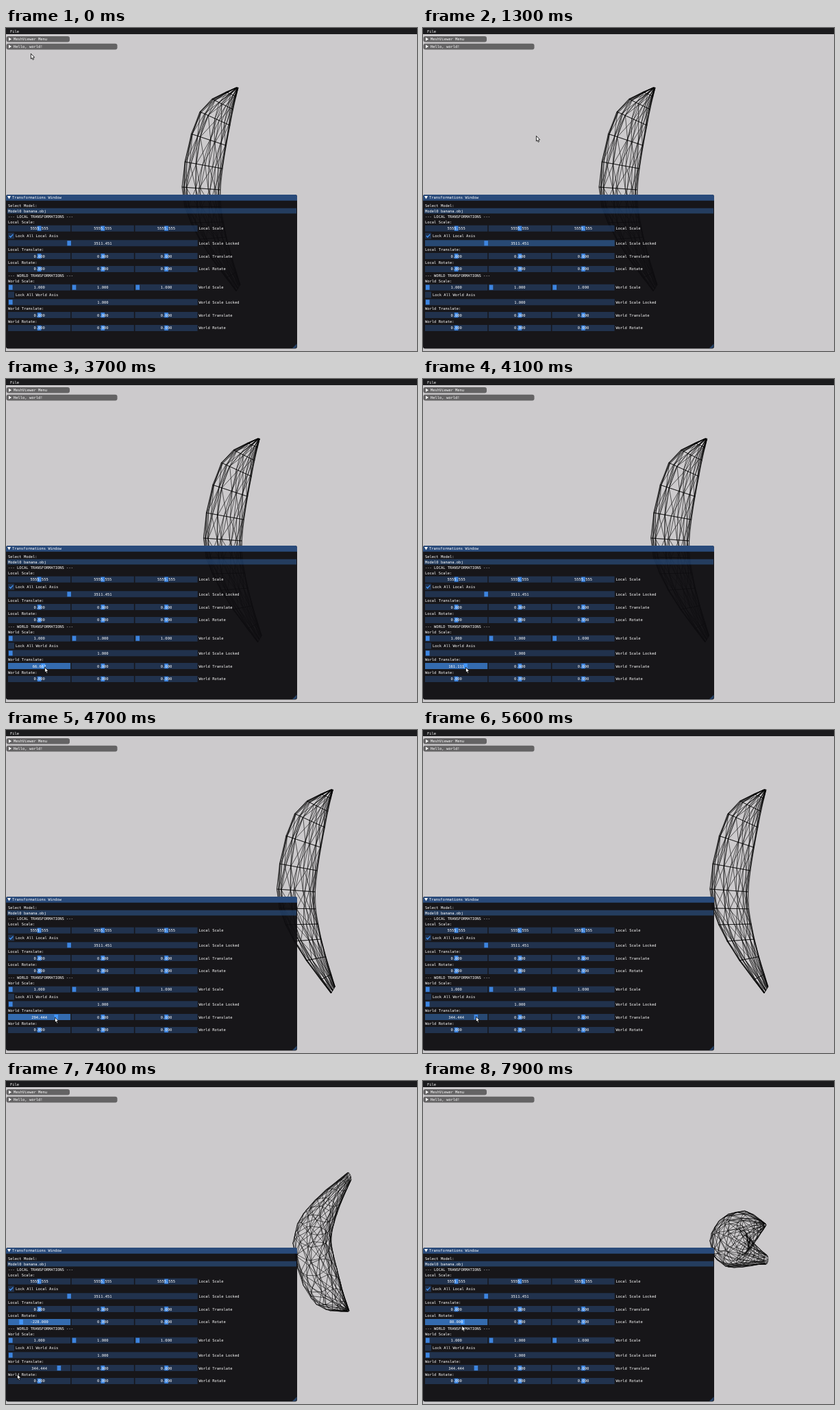
Animation of 600 by 471 pixels, one loop 8000 ms. Source, as an HTML page with a canvas:

```html
<!DOCTYPE html>
<html>
<head>
<meta charset="utf-8">
<style>
html, body { margin: 0; width: 100%; height: 100%; overflow: hidden; background: #cccacc; }
canvas { display: block; width: 600px; height: 471px; }
</style>
</head>
<body>
<canvas id="stage" width="600" height="471"></canvas>
<script>
const c = document.getElementById('stage').getContext('2d');
const LOOP = 8000, STEP = 100;

// Key points: [ms, value...]
const POINTER = [
  [0, 36, 37], [300, 60, 268], [600, 48, 430], [1000, 150, 405], [1200, 162, 314],
  [1300, 165, 157], [1400, 165, 131], [1700, 50, 432], [1800, 50, 311], [2000, 60, 429],
  [3000, 52, 423], [3200, 49, 420], [4100, 62, 420], [5100, 77, 417.5], [5600, 77, 417.5],
  [5900, 92, 410], [6400, 48, 352], [6800, 60, 352], [7400, 16, 427], [7900, 56.5, 356.5]
];
const MOVE = [[3400, 0], [4100, 161.111], [4200, 180], [4900, 338.889], [5100, 344.444]];
const TURN = [[6500, 0], [6800, 80], [7000, 140], [7500, -320], [7900, 80]];

// Mesh outline, tip to stem
const LEFT = [[336, 87], [283, 122], [257, 232], [282, 308], [336, 384]];
const RIGHT = [[339, 87], [327, 142], [313, 236], [322, 305], [342, 374]];
const RINGS = 13, SIDES = 16, DEPTH = 1.2, CY = 235.5;

function at(keys, t, i = 1) {
  const n = keys.findIndex(k => k[0] > t);
  if (n < 0) return keys[keys.length - 1][i];
  if (n === 0) return keys[0][i];
  const a = keys[n - 1], b = keys[n];
  return a[i] + (b[i] - a[i]) * (t - a[0]) / (b[0] - a[0]);
}
const snap = (v, step) => Math.round(v / step) * step;

// Catmull-Rom curve through pts, u from 0 to 1
function spline(pts, u) {
  const last = pts.length - 1, n = Math.min(Math.floor(u * last), last - 1), f = u * last - n;
  const p = k => pts[Math.max(0, Math.min(last, n + k))];
  return [0, 1].map(i => {
    const [a, b, d, e] = [p(-1)[i], p(0)[i], p(1)[i], p(2)[i]];
    return b + f / 2 * (d - a + f * (2 * a - 5 * b + 4 * d - e + f * (3 * (b - d) + e - a)));
  });
}

function box(x, y, w, h, fill, r = 0) {
  c.fillStyle = fill;
  c.beginPath();
  c.roundRect(x, y, w, h, r);
  c.fill();
}
function path(...pts) {
  c.beginPath();
  for (let i = 0; i < pts.length; i += 2) c.lineTo(pts[i], pts[i + 1]);
}
function poly(fill, ...pts) {
  c.fillStyle = fill;
  path(...pts);
  c.closePath();
  c.fill();
}
function text(s, x, cy, align = 'left') {
  c.fillStyle = '#fff';
  c.textAlign = align;
  c.fillText(s, x, cy + 2);
}

const mesh = Array.from({ length: RINGS }, (_, i) => {
  const [lx, ly] = spline(LEFT, i / (RINGS - 1)), [rx, ry] = spline(RIGHT, i / (RINGS - 1));
  const hx = (rx - lx) / 2, hy = (ry - ly) / 2, r = Math.hypot(hx, hy) * DEPTH;
  return Array.from({ length: SIDES }, (_, j) => {
    const a = (j + 0.3 * Math.sin(i * 5.1 + j * 3.7)) * 2 * Math.PI / SIDES;
    return [lx + hx + hx * Math.cos(a), ly + hy - CY + hy * Math.cos(a), r * Math.sin(a)];
  });
});

function drawMesh(shift, deg) {
  const cos = Math.cos(deg * Math.PI / 180), sin = Math.sin(deg * Math.PI / 180);
  const pts = mesh.map(ring => ring.map(([x, y, z]) => [x + shift, CY + y * cos - z * sin]));
  const edge = (a, b) => {
    path(...a, ...b);
    c.stroke();
  };
  c.strokeStyle = '#000';
  c.lineWidth = 0.6;
  pts.forEach((ring, i) => ring.forEach((p, j) => {
    const k = (j + 1) % SIDES, next = pts[i + 1];
    edge(p, ring[k]);
    if (next) {
      edge(p, next[j]);
      edge(p, next[k]);
    }
  }));
}

function drawPanel(t, move, turn) {
  const moving = t >= 3400 && t < 5300, turning = t >= 6500;
  // Hover trails the pointer by one step
  const mx = at(POINTER, t - STEP), my = at(POINTER, t - STEP, 2);
  const over = (x, y, w, h) => !moving && !turning && mx >= x && mx < x + w && my >= y && my < y + h;
  let top = 254.8;
  const next = h => (top += h) - h / 2;
  const line = s => text(s, 3, next(8));

  function frame(x, cy, w, active) {
    const hot = over(x, cy - 4.5, w, 9);
    box(x, cy - 4.5, w, 9, active ? 'rgba(66,150,250,.67)' : hot ? 'rgba(66,150,250,.4)' : 'rgba(41,74,122,.54)');
  }
  function slider(x, cy, w, pos, label, active) {
    frame(x, cy, w, active);
    box(x + 1 + pos * (w - 7.6), cy - 3.6, 5.6, 7.2, active ? '#4296fa' : '#3d85e0');
    text(label, x + w / 2, cy, 'center');
  }
  // The first slider may differ from the other two
  function triple(label, rest, pos, first = rest, firstPos = pos, active) {
    const cy = next(10.8);
    for (let i = 0; i < 3; i++) {
      slider(3 + i * 92.7, cy, 91.2, i ? pos : firstPos, i ? rest : first, !i && active);
    }
    text(label, 281.5, cy);
  }
  function check(label, on) {
    const cy = next(10.8);
    frame(3, cy, 9);
    text(label, 14, cy);
    if (!on) return;
    c.strokeStyle = '#4296fa';
    c.lineWidth = 1.2;
    path(4.9, cy, 6.7, cy + 2, 10.3, cy - 2.2);
    c.stroke();
  }
  function group(name, scale, pos, lock, lockPos, move, turn) {
    line(`--- ${name.toUpperCase()} TRANSFORMATIONS ---`);
    line(name + ' Scale:');
    triple(name + ' Scale', scale, pos);
    check(`Lock All ${name} Axis`, lockPos > 0);
    const cy = next(10.8);
    slider(3, cy, 276.8, lockPos, lock);
    text(name + ' Scale Locked', 281.5, cy);
    line(name + ' Translate:');
    triple(name + ' Translate', '0.000', .5, move.toFixed(3), .5 + move / 1000, move && moving);
    line(name + ' Rotate:');
    triple(name + ' Rotate', '0.000', .5, turn.toFixed(3), .5 + turn / 720, turn && turning);
  }

  box(0, 243, 425, 224.5, 'rgba(14,13,16,.95)', 3);
  box(0, 243, 425, 8.8, '#294a7a', [3, 3, 0, 0]);
  poly('#fff', 2, 245, 7, 245, 4.5, 249.5);
  text('Transformations Window', 9, 247.4);
  poly('rgba(66,150,250,.35)', 424.5, 460.5, 424.5, 465, 422.5, 467, 418, 467);

  line('Select Model:');
  box(2, top, 422, 7.8, over(2, top, 422, 8) ? 'rgba(66,150,250,.8)' : 'rgba(66,150,250,.31)');
  line('Model0 banana.obj');
  group('Local', '5555.555', .5, '3511.451', .317, 0, turn);
  group('World', '1.000', 0, '1.000', 0, move, 0);
}

function collapsed(y, w, label) {
  box(0.5, y, w, 8.6, 'rgba(0,0,0,.51)', 3);
  poly('#fff', 4, y + 1.8, 8, y + 4.3, 4, y + 6.8);
  text(label, 11, y + 4.4);
}

function drawPointer(x, y) {
  c.save();
  c.translate(x, y);
  c.strokeStyle = '#000';
  c.lineWidth = 0.8;
  c.lineJoin = 'round';
  poly('#fff', .4, .4, .4, 8, 2, 6.6, 3.2, 9.3, 4.5, 8.7, 3.4, 6.1, 5.7, 5.9);
  c.stroke();
  c.restore();
}

function draw(now) {
  const t = Math.floor(now % LOOP / STEP) * STEP;
  const move = snap(at(MOVE, t), 1000 / 180), turn = snap(at(TURN, t), 4);

  c.font = '5.45px "DejaVu Sans Mono", monospace';
  box(0, 0, 600, 471, '#cccacc');
  drawMesh(move * .47, turn);
  box(0, 0, 600, 9, '#1b1b1d');
  text('File', 6, 4.7);
  collapsed(12, 92.5, 'MeshViewer Menu');
  collapsed(22.8, 162, 'Hello, world!');
  drawPanel(t, move, turn);
  drawPointer(at(POINTER, t), at(POINTER, t, 2));
  requestAnimationFrame(() => draw(performance.now() - start));
}
const start = performance.now();
draw(0);
</script>
</body>
</html>
```
